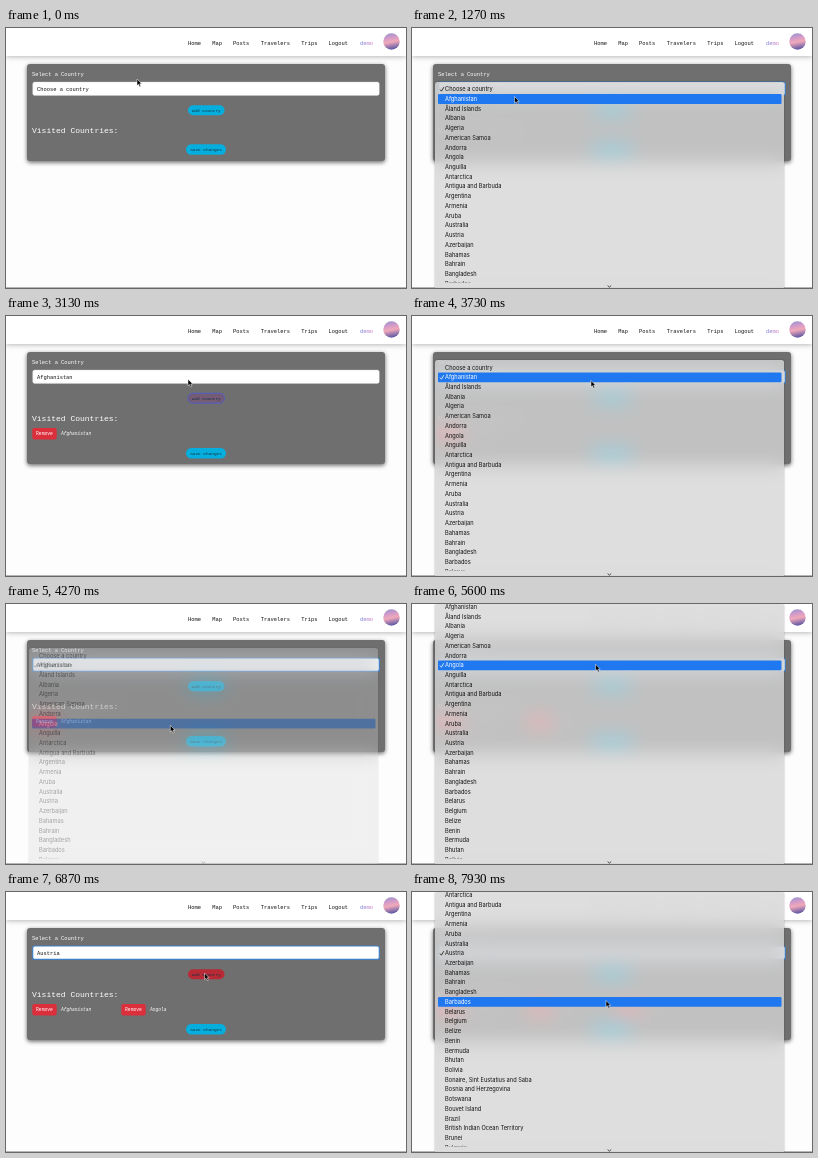
Write an HTML page that moves like this. It is 400 px wide and 260 px high and loops after 8 s.

```html
<!DOCTYPE html>
<html lang="en">
<head>
<meta charset="utf-8">
<title>Visited countries</title>
<style>
  html, body { margin: 0; width: 100%; height: 100%; overflow: hidden; background: #fdfdfd; }
  svg { position: absolute; left: 0; top: 0; width: 400px; height: 260px; overflow: hidden; }
  text { white-space: pre; }
  .mono { font-family: "Liberation Mono", monospace; }
  nav, .card { position: absolute; }
  nav { left: 0; top: 0; width: 400px; height: 28px; background: #fff; box-shadow: 0 1px 5px rgba(0,0,0,.28); }
  .card { left: 21px; top: 36px; width: 358px; border-radius: 3px; background: #6f6f6f; box-shadow: 0 1.5px 4px rgba(0,0,0,.6); }
  #menu {
    position: absolute; left: 23px; width: 348.5px; bottom: 0; overflow: hidden; border-radius: 2.5px 2.5px 0 0;
    background: rgba(214,214,214,.8); backdrop-filter: blur(9px) saturate(1.8);
    box-shadow: 0 0 2px rgba(0,0,0,.35);
  }
  #menu svg { left: -23px; }
  #menu text { font: 5.7px Inter, sans-serif; }
</style>
</head>
<body>
<nav></nav>
<div class="card" id="card"></div>
<svg viewBox="0 0 400 260" class="mono">
  <defs>
    <linearGradient id="sky" x1="0" y1="0" x2="0.2" y2="1">
      <stop offset="0" stop-color="#8f93cf"/><stop offset=".35" stop-color="#d59bc8"/>
      <stop offset=".6" stop-color="#f0a9b8"/><stop offset="1" stop-color="#6d5fa8"/>
    </linearGradient>
    <linearGradient id="userInk"><stop stop-color="#6a7be0"/><stop offset="1" stop-color="#d973b8"/></linearGradient>
  </defs>
  <g id="links" font-size="5.4"></g>
  <circle cx="385.5" cy="13.5" r="8.2" fill="url(#sky)"/>
  <rect y="259" width="400" height="1" fill="#b5b5b5"/>
  <text x="26" y="47.8" font-size="5.4" fill="#fff">Select a Country</text>
  <rect id="field" x="26.7" y="54" width="346.6" height="13.4" rx="2" fill="#fff"/>
  <text id="value" x="31" y="62.6" font-size="5.4" fill="#111"></text>
  <rect id="add" x="182" y="77.2" width="36.5" height="10" rx="5"/>
  <text x="200.2" y="83.8" font-size="4.4" fill="#16303f" text-anchor="middle">Add Country</text>
  <text x="26" y="104.6" font-size="8" fill="#fff">Visited Countries:</text>
  <g id="visited"></g>
  <g id="save">
    <rect x="180" y="116.3" width="40" height="10.5" rx="5.2" fill="#06aede"/>
    <text x="200" y="123.2" font-size="4.4" fill="#16303f" text-anchor="middle">Save Changes</text>
  </g>
</svg>
<div id="menu">
  <svg viewBox="0 0 400 260" id="menuPage">
    <clipPath id="listArea"><rect width="400" height="254.6"/></clipPath>
    <g clip-path="url(#listArea)">
      <rect id="highlight" x="26" width="343.5" height="9.8" rx="1" fill="#1f78f0"/>
      <g id="items"></g>
      <path id="check" d="M28 .2 l1.4 1.7 2.4-4" fill="none" stroke-width=".8"/>
    </g>
    <path d="M195.6 257.6 l1.8 1.5 1.8-1.5" fill="none" stroke="#222" stroke-width=".8"/>
  </svg>
</div>
<svg viewBox="0 0 400 260">
  <path id="cursor" d="M0 0 V6.6 L1.5 5.3 2.6 7.7 3.8 7.2 2.7 4.8 H4.7 Z" fill="#000" stroke="#fff" stroke-width=".5"/>
</svg>
<script>
const $ = id => document.getElementById(id);
const LOOP = 8000, ROW = 9.72, FIELD_Y = 61.3;

const countries = ('Choose a country|Afghanistan|Åland Islands|Albania|Algeria|American Samoa|Andorra|Angola|' +
  'Anguilla|Antarctica|Antigua and Barbuda|Argentina|Armenia|Aruba|Australia|Austria|Azerbaijan|Bahamas|' +
  'Bahrain|Bangladesh|Barbados|Belarus|Belgium|Belize|Benin|Bermuda|Bhutan|Bolivia|' +
  'Bonaire, Sint Eustatius and Saba|Bosnia and Herzegovina|Botswana|Bouvet Island|Brazil|' +
  'British Indian Ocean Territory|Brunei|Bulgaria').split('|');

// Each visit: the menu opens, a country is picked, the Add button is hovered, clicked and left.
const visits = [
  { open: 790, pick: 1790, hover: 2380, click: 2720, leave: 3000, index: 1 },
  { open: 3590, pick: 4180, hover: 4690, click: 4920, leave: 5080, index: 7 },
  { open: 5320, pick: 6120, hover: 6560, click: 6990, leave: 7180, index: 15 },
  { open: 7460, pick: Infinity, hover: Infinity, click: Infinity, leave: Infinity, index: 20 }
];
const FADE = 140;

// Pointer stops: time, x, y
const stops = [
  [0, 131, 51], [200, 130, 54.5], [730, 130, 54.5], [800, 130, 57.5], [1200, 102.5, 68.5],
  [1870, 102.5, 68.5], [2470, 200, 81], [2870, 200, 81], [3130, 182, 63.2], [3470, 180, 60.5],
  [3660, 180, 60.5], [4130, 164.3, 121.3], [4330, 164.3, 121.3], [4800, 195, 81], [5000, 195, 81],
  [5270, 184, 61], [5600, 183.5, 60.3], [6000, 186, 139], [6200, 186, 139], [6700, 198.5, 81],
  [7080, 198.5, 81], [7400, 194, 61], [7600, 194, 61], [7930, 194, 108.5], [8000, 194, 108.5]
];

const clamp = v => Math.max(0, Math.min(1, v));
const ease = v => v * v * (3 - 2 * v);
const mix = (a, b, k) => a + (b - a) * k;

function pointerAt(t) {
  const i = Math.max(1, stops.findIndex(s => s[0] > t));
  const [t0, x0, y0] = stops[i - 1], [t1, x1, y1] = stops[i];
  const k = ease(clamp((t - t0) / (t1 - t0)));
  return [mix(x0, x1, k), mix(y0, y1, k)];
}

$('links').innerHTML = [['Home', 182], ['Map', 206.3], ['Posts', 227], ['Travelers', 254.8],
  ['Trips', 295.3], ['Logout', 322.6], ['demo', 354]]
  .map(([label, x]) => `<text x="${x}" y="17.3" fill="${label === 'demo' ? 'url(#userInk)' : '#111'}">${label}</text>`).join('');

$('visited').innerHTML = visits.slice(0, 3).map((v, i) => `<g transform="translate(${i * 89} 0)">
  <rect x="26.3" y="112" width="24.4" height="11.4" rx="1.8" fill="#dc2f3c"/>
  <text x="38.5" y="119.3" font-size="4.7" fill="#fff" text-anchor="middle">Remove</text>
  <text x="55" y="119.2" font-size="4.6" font-style="italic" fill="#fff">${countries[v.index]}</text></g>`).join('');

$('items').innerHTML = countries.map((name, i) => `<text x="33" y="${i * ROW + 2}">${name}</text>`).join('');

function drawMenu(t, pointerY) {
  const n = visits.findIndex(v => t >= v.open && t < v.pick + FADE);
  $('menu').style.display = n < 0 ? 'none' : 'block';
  if (n < 0) return;
  const selected = n ? visits[n - 1].index : 0;
  const firstY = FIELD_Y - selected * ROW;
  const top = Math.max(0, firstY - 7.3);
  const hovered = Math.round((pointerY - firstY) / ROW);
  $('menu').style.top = top + 'px';
  $('menu').style.opacity = 1 - clamp((t - visits[n].pick) / FADE);
  $('menuPage').style.top = -top + 'px';
  $('items').setAttribute('transform', `translate(0 ${firstY})`);
  $('highlight').setAttribute('y', firstY + hovered * ROW - 4.9);
  $('check').setAttribute('transform', `translate(0 ${FIELD_Y})`);
  $('check').setAttribute('stroke', hovered === selected ? '#fff' : '#111');
  [...$('items').children].forEach((item, i) => item.setAttribute('fill', i === hovered ? '#fff' : '#111'));
}

function drawPage(t) {
  const picked = visits.filter(v => t >= v.pick + FADE).pop();
  $('value').textContent = countries[picked ? picked.index : 0];

  const count = visits.filter(v => t >= v.click).length;
  [...$('visited').children].forEach((row, i) => row.setAttribute('visibility', i < count ? 'visible' : 'hidden'));
  const extra = count ? 15.6 : 0;
  $('card').style.height = 96.5 + extra + 'px';
  $('save').setAttribute('transform', `translate(0 ${extra})`);

  const fieldFocus = visits.some(v => t >= v.open && t < v.click);
  $('field').setAttribute('stroke', fieldFocus ? '#3f7fc6' : '#d0d0d0');
  $('field').setAttribute('stroke-width', fieldFocus ? 1.2 : 0.4);

  const hover = Math.max(...visits.map(v => v.hover > LOOP ? 0 :
    Math.min(clamp((t - v.hover) / 250), 1 - clamp((t - v.leave) / 350))));
  const rgb = [mix(6, 184, hover), mix(174, 42, hover), mix(222, 54, hover)].map(Math.round);
  const addFocus = visits.some((v, i) => t >= v.click && t < visits[i + 1].open);
  $('add').setAttribute('fill', `rgb(${rgb})`);
  $('add').setAttribute('stroke', addFocus ? '#4f5fc4' : 'none');
}

function frame(now) {
  const t = Math.floor((now % LOOP + 4) * 0.015) / 0.015;
  const [x, y] = pointerAt(t);
  drawPage(t);
  drawMenu(t, y);
  $('cursor').setAttribute('transform', `translate(${x} ${y})`);
}

const start = performance.now();
(function tick() {
  frame(performance.now() - start);
  requestAnimationFrame(tick);
})();
</script>
</body>
</html>
```
